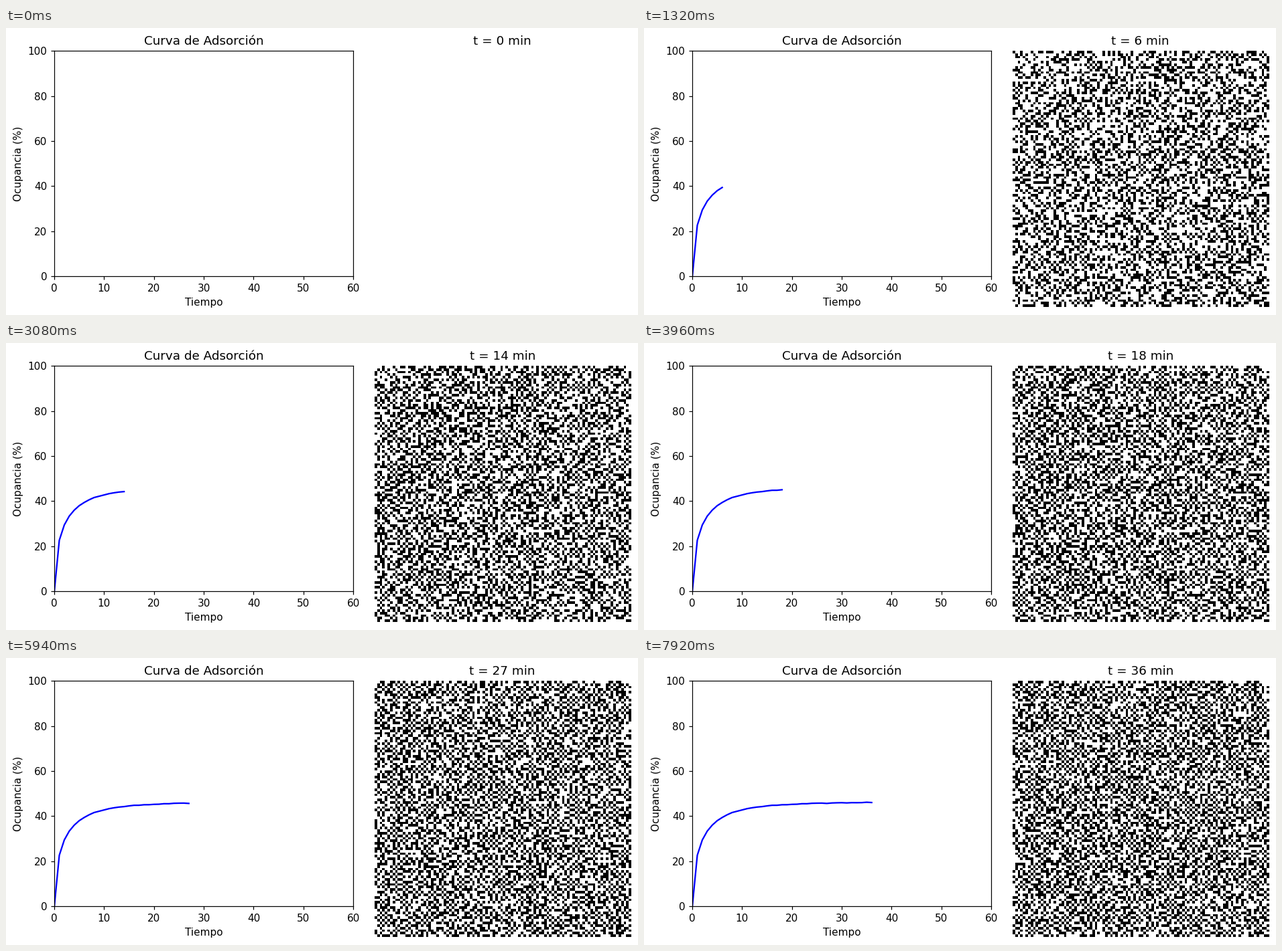
A matplotlib script that plays this animation: 943 by 429 pixels, repeating every 8000 ms.

```python
import numpy as np
import matplotlib.pyplot as plt
from matplotlib.animation import FuncAnimation

W, H, DPI = 943, 429, 110
LOOP, TICK, STEP = 8000, 20, 220
N = 100                                 # lattice side
LIMIT, RATE, POWER = 46.3, 0.672, 0.585  # stretched-exponential uptake
CROWDING = 0.3                          # penalty for filling crowded sites
TURNOVER = 100                          # sites that desorb per minute

rng = np.random.default_rng(7)
minutes = np.arange(LOOP // STEP + 1)
occupancy = LIMIT * (1 - np.exp(-RATE * minutes ** POWER))
occupancy[1:] += rng.normal(0, 0.08, len(minutes) - 1)


def crowding(grid):
    """Free for one occupied neighbour, then growing with each further one."""
    n = sum(np.roll(grid, s, axis) for s in (-1, 1) for axis in (0, 1))
    return CROWDING * n * (n - 1)


def pick(log_weight, allowed, count):
    """Weighted choice of sites without replacement."""
    keys = np.where(allowed, log_weight + rng.gumbel(size=allowed.shape), -np.inf)
    return np.argsort(keys, axis=None)[::-1][:count]


def simulate(parts=6):
    grid = np.zeros((N, N))
    grids = [grid.copy()]
    for percent in occupancy[1:]:
        if grid.any():
            grid.flat[pick(crowding(grid), grid > 0, TURNOVER)] = 0
        goal = round(percent * N * N / 100)
        for left in range(parts, 0, -1):
            gain = max(0, round((goal - grid.sum()) / left))
            grid.flat[pick(-crowding(grid), grid == 0, gain)] = 1
        grids.append(grid.copy())
    return grids


def add_axes(left, top, width, height):
    return fig.add_axes([left / W, 1 - (top + height) / H, width / W, height / H])


grids = simulate()

plt.rcParams["font.family"] = "DejaVu Sans"
fig = plt.figure(figsize=((W + 1e-6) / DPI, (H + 1e-6) / DPI), dpi=DPI,
                 facecolor="white")

curve_ax = add_axes(72.1, 34.2, 446, 337)
curve_ax.set(xlim=(0, 60), ylim=(0, 100), xlabel="Tiempo",
             ylabel="Ocupancia (%)", title="Curva de Adsorción")
line, = curve_ax.plot([], [], color="blue", lw=1.5)

grid_ax = add_axes(549.5, 34.2, 382.4, 382.4)
grid_ax.set_axis_off()
image = grid_ax.imshow(grids[0], cmap="gray_r", vmin=0, vmax=1,
                       interpolation="nearest", aspect="auto")
title = grid_ax.set_title("t = 0 min")


def update(frame):
    t = frame * TICK // STEP
    line.set_data(minutes[:t + 1], occupancy[:t + 1])
    image.set_data(grids[t])
    title.set_text(f"t = {t} min")
    return line, image, title


ani = FuncAnimation(fig, update, frames=LOOP // TICK, interval=TICK,
                    repeat=True, repeat_delay=0, blit=False)
plt.show()
```
